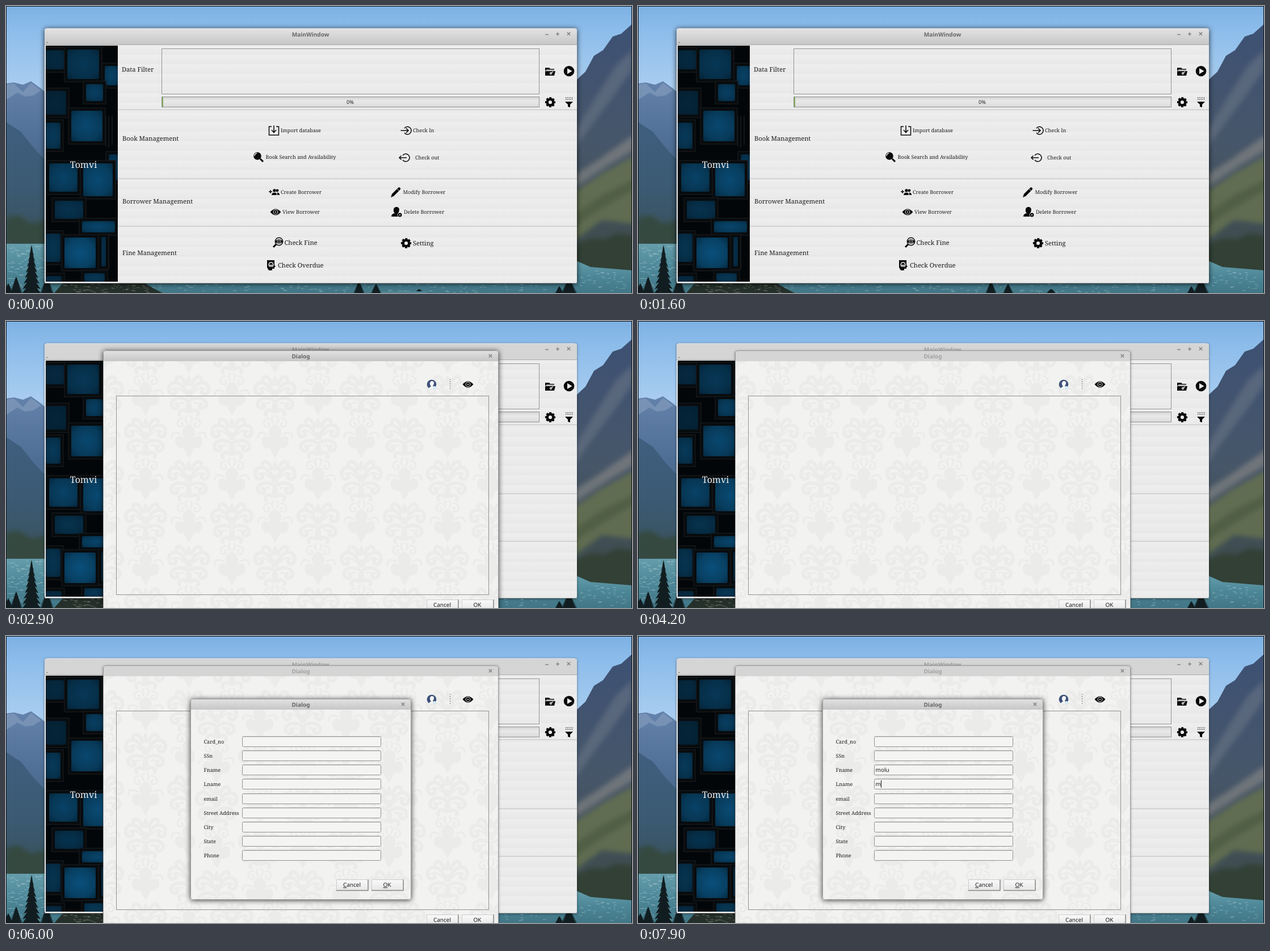
These frames come from a looping animation (1103x507 px, 8000 ms). An HTML page:

```html
<!DOCTYPE html>
<html lang="en">
<head>
<meta charset="utf-8">
<title>Library manager</title>
<style>
html, body { margin: 0; width: 100%; height: 100%; overflow: hidden; background: #84b6e6; }
svg { display: block; width: 1103px; height: 507px; }
text { font-family: "Noto Sans", "Open Sans", sans-serif; font-size: 10px; fill: #1c1c1c; text-rendering: geometricPrecision; white-space: pre; }
.serif { font-family: "Noto Serif", serif; }
.brand { fill: #f4f4f4; }
.title { font-weight: 700; fill: #666; text-anchor: middle; }
.mid { text-anchor: middle; }
.bar { fill: url(#bar); }
.win { filter: drop-shadow(0 1px 5px rgba(0,0,0,.75)); }
.off { filter: drop-shadow(0 1px 2px rgba(0,0,0,.4)); }
.off .bar { fill: #d5d5d5; }
.off .title { fill: #a2a2a2; }
.line { fill: none; stroke: #0a0a0a; stroke-width: 1.5; }
.light { fill: none; stroke: #efefef; stroke-width: 1.3; }
</style>
</head>
<body>
<svg id="stage" viewBox="0 0 1103 507" xmlns="http://www.w3.org/2000/svg"></svg>
<script>
const LOOP = 8000;
const stage = document.getElementById('stage');

let seed = 11;
const random = () => (seed = (seed * 16807) % 2147483647) / 2147483647;

// Basic builders
const rect = (x, y, w, h, fill, more = '') =>
  `<rect x="${x}" y="${y}" width="${w}" height="${h}" fill="${fill}" ${more}/>`;
const path = (d, fill, more = '') => `<path d="${d}" fill="${fill}" ${more}/>`;
const text = (x, y, str, cls = '', size = 10) =>
  `<text x="${x}" y="${y}" class="${cls}" style="font-size:${size}px">${str}</text>`;
const gradient = (id, stops) =>
  `<linearGradient id="${id}" x2="0" y2="1">${stops.map(([at, color]) =>
    `<stop offset="${at}" stop-color="${color}"/>`).join('')}</linearGradient>`;
const frame = (x, y, w, h, fill = 'none', r = 0) =>
  rect(x + .5, y + .5, w, h, fill, `stroke="#929292" rx="${r}"`);

// Icons, each drawn around 0,0
const eye = '<path d="M-9.5 0Q0-11 9.5 0Q0 11-9.5 0Z"/><circle r="4.4" fill="#efefef"/><circle r="3.4"/><circle r="1.1" fill="#efefef"/>';
const lens = '<path d="M-3 3L-8 8" class="line" style="stroke-width:3"/>';
const person = '<path d="M-9 8Q-9 3-3 2Q-6-1-5-5Q-4-9 0-9Q4-9 5-5Q5-1 3 2Q8 3 8 8Z"/>';
const icons = {
  eye,
  folder: '<path d="M-9-6H-2L0-4H7V-1H-9ZM-9 0H9L7 8H-9Z"/><path d="M-7-2H8" class="light"/><circle cx="1" cy="4" r="1.5" class="light"/><path d="M2 3L5 1" class="light"/>',
  play: '<circle r="9.3"/><path d="M-3-5L5.5 0L-3 5Z" fill="#efefef"/>',
  gear: '<circle r="5.3" fill="none" stroke="#0a0a0a" stroke-width="4.4"/><circle r="7.7" fill="none" stroke="#0a0a0a" stroke-width="2.8" stroke-dasharray="3.6 2.448" stroke-dashoffset="1.8"/>',
  funnel: '<path d="M-7-1H7L2 4V9L-2 8V4Z"/><path d="M-6-8H7M-6-5H7" class="line" style="stroke-width:1.6;stroke-dasharray:1.3 1.5;opacity:.75"/>',
  import: '<path d="M-4-7H-8.5V8H8.5V-7H4M0-9V3M-4-1L0 3.5L4-1" class="line"/>',
  search: `<g transform="scale(-1 1)">${lens}<circle cx="2" cy="-2" r="6.8"/></g><path d="M-7-2A5 5 0 0 1-3-7" class="light"/>`,
  checkIn: '<path d="M-3-4A6.7 6.7 0 1 1-3 4M-9.5 0H4M0-4L4 0L0 4" class="line"/>',
  checkOut: '<path d="M-3-4A6.7 6.7 0 1 1-3 4M4 0H-9M-5.5-3.5L-9 0L-5.5 3.5" class="line"/>',
  group: '<path d="M-9-1H-3M-6-4V2" class="line"/><circle cx="1" cy="-3" r="2.7"/><circle cx="6" cy="-3" r="2.4"/><path d="M-4 5Q-3 0 1 1Q5 0 5 5ZM6 5V2L5 1Q10 0 10 5Z"/>',
  pencil: '<path d="M-9 9L-7 3L4-8Q6-10 8-7Q9-6 7-4L-4 7Z"/><path d="M2-6L6-2" class="light" style="stroke-width:.8"/>',
  removeUser: `${person}<circle cx="6" cy="5" r="4.3" fill="#efefef"/><circle cx="6" cy="5" r="3.5"/><path d="M5 4L7 6M7 4L5 6" class="light" style="stroke-width:.9"/>`,
  eyeSearch: `${lens}<circle cx="2" cy="-2" r="6.8" fill="#efefef" stroke="#0a0a0a" stroke-width="1.4"/><g transform="translate(2 -2) scale(.74)">${eye}</g>`,
  head: '<path d="M-7-9H6V-1L8 3H6V6H2V9H-4L-7 4Z"/><path d="M-4 0Q-4-5 0-5Q4-5 4 0Z" class="light"/><path d="M-4 2H4" class="light"/>',
  pay: '<circle cx="4" cy="-4" r="4.3" fill="#efefef" stroke="#0a0a0a" stroke-width="1.4"/><path d="M5.5-6Q2-6 4-4Q6-3 3-2" class="line" style="stroke-width:.9"/><path d="M-9 2H-6V8H-9ZM-5 2H-1L1 3H4V5L9 1L10 3L4 8H-5Z"/>',
  user: '<circle r="8.3" fill="#3d5078"/><path d="M-5 8Q-4 4-1 4Q-4-1-3-3Q-2-6 1-6Q5-5 4-1L2 3L5 5V8Z" fill="#f5f5f5"/><circle cx="5" cy="6" r="3" fill="#d7eaf4"/>',
};
const icon = (name, x, y) => `<g transform="translate(${x} ${y})" fill="#0a0a0a">${icons[name]}</g>`;

const titleBar = (x, y, w, h, cx, label) =>
  path(`M${x} ${y + h}V${y + 4}Q${x} ${y} ${x + 4} ${y}H${x + w - 4}Q${x + w} ${y} ${x + w} ${y + 4}V${y + h}Z`, 'none', 'class="bar"') +
  path(`M${x + 4} ${y + .5}H${x + w - 4}`, 'none', 'stroke="#f3f3f3" stroke-opacity=".7"') +
  text(cx, y + 14.3, label, 'title', 10.05);
const cross = (x, y) => path(`M${x - 2.7} ${y - 2.7}l5.4 5.4m0-5.4l-5.4 5.4`, 'none', 'stroke="#858585" stroke-width="1.6"');
const dots = (x, y) => path(`M${x + .5} ${y}v20`, 'none', 'stroke="#777" stroke-dasharray="2 2"');

function button(x, y, label, underline = true) {
  const str = underline ? `<tspan text-decoration="underline">${label[0]}</tspan>${label.slice(1)}` : label;
  return rect(x, y, 56, 20, 'url(#button)') +
    path(`M${x + .5} ${y + 19}V${y + .5}H${x + 56}`, 'none', 'stroke="#ccc"') +
    path(`M${x} ${y + 19.5}H${x + 56}V${y}`, 'none', 'stroke="#858585" stroke-width="1.5"') +
    text(x + 27.5, y + 13.2, str, 'mid');
}

// Damask wallpaper: motifs in staggered columns, each mirrored about its axis
function damask(id, x, y) {
  const ink = '#ebebea';
  const half = `<path d="M0-34Q8-24 0-14ZM0 34Q11 20 0 8ZM0-10Q9-3 0 6Z"/>
    <path d="M0 52Q17 60 8 76Q24 68 24 84Q22 96 9 95Q4 106 0 112Z"/>
    <g fill="none" stroke="${ink}" stroke-width="6" stroke-linecap="round">
    <path d="M3 2C10-28 36-26 35-9C34 3 20 1 23-7M4 9C22 1 36 12 29 22C22 29 15 20 22 16M6-18C10-34 22-34 22-27M4 30C12 24 20 30 16 36"/>
    <path d="M9-4Q20-16 29-9M10 15Q17 12 20 22M11 42C22 43 23 56 14 57C9 57 9 51 13 50M3 50C7 46 6 40 3 38M14 70Q30 62 30 76" stroke-width="3"/></g>`;
  const motif = (dx, dy) => `<g transform="translate(${dx} ${dy})" fill="${ink}">${half}<g transform="scale(-1 1)">${half}</g></g>`;
  return `<pattern id="${id}" x="${x - 38}" y="${y - 38}" width="152" height="150" patternUnits="userSpaceOnUse">
    ${rect(0, 0, 152, 150, '#f2f2f1')}${motif(38, 38)}${motif(38, -112)}${motif(114, 113)}${motif(114, -37)}</pattern>`;
}

function dialog(id, x, y, w, h, cx, body) {
  return `<g id="${id}" class="win">${rect(x, y, w, h, `url(#${id}Paper)`, 'rx="4"')}
    ${titleBar(x, y, w, 19, cx, 'Dialog')}${cross(x + w - 14.5, y + 9.5)}
    ${rect(x + .5, y + .5, w - 1, h - 1, 'none', 'rx="4" stroke="#777" stroke-opacity=".65"')}${body}</g>`;
}

// Landscape
function fir(x, top, base, w) {
  let left = '', right = '';
  const tiers = 9;
  for (let i = 1; i <= tiers; i++) {
    const y = top + (base - top) * i / tiers, half = w / 2 * i / tiers;
    right += `L${x + half} ${y}L${x + half * .6} ${y - 2}`;
    left = `L${x - half * .6} ${y - 2}L${x - half} ${y}` + left;
  }
  return path(`M${x} ${top}${right}${left}Z`, '#111d20');
}

function flecks(x, w, y, h, count, color) {
  let d = '';
  for (let i = 0; i < count; i++) d += `M${x + random() * w} ${y + random() * h}h${2 + random() * 5}`;
  return path(d, 'none', `stroke="${color}" stroke-opacity=".5"`);
}

function landscape() {
  const glint = '#b4d0d8';
  return rect(0, 0, 1103, 507, 'url(#sky)') +
    path('M0 137L14 135L30 139L44 133L62 146L90 170V430H0Z', 'url(#farHill)') +
    path('M0 139L14 137L30 152L44 136L62 149L48 158L34 160L20 153L0 166Z', '#8fa6c4', 'opacity=".5"') +
    path('M0 205L26 222L50 252L72 275V430H0Z', 'url(#leftHill)') +
    path('M0 374L22 370L44 384L70 378V424H0Z', '#35483f', 'filter="url(#soft)"') +
    path('M990 148L1006 130L1021 116L1036 88L1052 78L1069 54L1084 49L1103 32V470H990Z', 'url(#nearHill)') +
    `<g clip-path="url(#slope)"><g filter="url(#soft)">` +
    path('M1000 225L1040 160L1075 105L1103 78V112L1070 160L1036 205L1000 255Z', '#6c7788', 'opacity=".55"') +
    path('M1000 300L1046 270L1110 225V252L1060 282L1000 322Z', '#8b8a87', 'opacity=".6"') +
    path('M1000 330L1050 296L1110 262V385L1050 378L1000 415Z', '#66734f', 'opacity=".85"') +
    path('M1000 368L1050 334L1110 304V322L1044 362L1000 392Z', '#46553f', 'opacity=".6"') +
    path('M1000 425L1030 410L1056 412L1075 402L1110 406V480H1000Z', '#303f36') + '</g></g>' +
    rect(0, 420, 1006, 87, 'url(#lake)') +
    path('M1000 448L1030 461L1103 467V507H1000Z', 'url(#lake)') +
    flecks(2, 65, 424, 80, 110, glint) + flecks(200, 800, 491, 15, 110, glint) + flecks(1008, 92, 468, 36, 35, glint) +
    fir(45, 422, 510, 36) + fir(18, 478, 512, 28) + fir(4, 490, 512, 24) + fir(72, 476, 512, 30) +
    path('M85 507L100 490H245L262 500L276 507Z', '#25302b') + flecks(95, 160, 491, 15, 60, '#9a9a86') +
    fir(622, 486, 512, 26) + fir(652, 491, 512, 26) + fir(992, 480, 512, 36) + fir(975, 495, 512, 22) + fir(728, 500, 514, 34) +
    `<g id="shore">${rect(661, 504, 81, 3, '#4f8392')}</g>`;
}

// Framed blue tiles of the side panel: x, y, width, height, brightness
const tiles = [
  [70, 78, 32, 34, .3], [174, 106, 24, 34, .75], [70, 150, 36, 42, .2], [108, 77, 56, 52, .55],
  [141, 138, 30, 30, .7], [70, 206, 26, 46, .6], [115, 185, 55, 54, .85], [181, 262, 16, 46, .6],
  [76, 278, 50, 50, .75], [136, 278, 52, 58, .9], [86, 344, 50, 32, .45], [134, 380, 58, 20, .8],
  [70, 402, 26, 50, .5], [103, 409, 55, 54, 1], [168, 408, 8, 52, .4], [138, 472, 36, 15, .55], [70, 477, 28, 10, .3],
];

function sidePanel() {
  return `<g clip-path="url(#panel)">${rect(69, 70, 128, 418, '#030608')}` +
    tiles.map(([x, y, w, h, glow]) =>
      rect(x - 5, y - 5, w + 10, h + 10, '#080b0d', 'stroke="#15191b" stroke-width="1.5"') +
      rect(x, y, w, h, '#041a29', 'rx="2"') + rect(x, y, w, h, 'url(#tile)', `rx="2" opacity="${glow}"`)).join('') +
    path('M176 195V248M181 195V250M187 195V245M181 405V464', 'none', 'stroke="#14181a" stroke-width="2"') +
    '</g>' + text(136.5, 286, 'Tomvi', 'serif mid brand', 16);
}

const actions = [
  ['import', 472, 220, 484, 'Import database', 9.05], ['checkIn', 705, 220, 717, 'Check In', 9.05],
  ['search', 445, 267, 457.5, 'Book Search and Availability', 9.05], ['checkOut', 702, 268, 721, 'Check out', 9.05],
  ['group', 472, 329, 484, 'Create Borrower', 9.05], ['pencil', 687, 329, 699.5, 'Modify Borrower', 9.05],
  ['eye', 475, 364, 487, 'View Borrower', 9.05], ['removeUser', 688, 364, 701, 'Delete Borrower', 9.05],
  ['eyeSearch', 479, 418, 490.5, 'Check Fine', 11.15], ['gear', 705, 419, 717, 'Setting', 11.15],
  ['head', 467, 458, 479, 'Check Overdue', 11.15],
];
const sections = [[204, 116, 'Data Filter'], [205, 238, 'Book Management'], [205, 348.5, 'Borrower Management'], [205, 440, 'Fine Management']];

function mainWindow() {
  return `<g id="main" class="win">${rect(68, 40, 938, 450, '#ececec', 'rx="4"')}` +
    titleBar(68, 39.5, 938, 29, 536.5, 'MainWindow') +
    path('M950 50.5h6M969 49.5h6M972 46.5v6', 'none', 'stroke="#858585" stroke-width="1.6"') + cross(991.5, 49) +
    text(71, 65, '.') + path('M68 68.5H1006', 'none', 'stroke="#a9a9a9"') +
    rect(198, 69, 808, 419, 'url(#stripes)') + sidePanel() +
    [183, 305, 389].map(y => rect(198, y - .5, 808, 2, '#cdcdcd') + rect(198, y + 1.5, 808, 1, '#f7f7f7')).join('') +
    frame(274, 75, 665, 80) + frame(274, 160, 665, 18, 'url(#progress)') +
    rect(275, 161, 2, 17, '#7fae58') + text(606.5, 173.2, '0%', 'mid', 9.1) +
    sections.map(([x, y, label]) => text(x, y, label, 'serif', 11.15)).join('') +
    actions.map(([name, x, y, tx, label, size]) => icon(name, x, y) + text(tx, y + size * .37, label, 'serif', size)).join('') +
    icon('folder', 959, 115) + icon('play', 992, 115) + icon('gear', 959, 170) + icon('funnel', 992, 170) +
    path('M68 489.5H1006', 'none', 'stroke="#a5a5a5"') + '</g>';
}

// Form dialog
const fields = ['Card_no', 'SSn', 'Fname', 'Lname', 'email', 'Street Address', 'City', 'State', 'Phone'];
const rowY = i => Math.round(186 + i * 25.15);
const form = fields.map((label, i) =>
  text(348.5, rowY(i) + 3.6, label, 'serif', 9.05) +
  frame(416, rowY(i) - 9, 244, 18, '#f4f4f3', 2) +
  path(`M418 ${rowY(i) - 7.5}h241`, 'none', 'stroke="#dedede"') +
  `<text id="value${i}" x="418.6" y="${rowY(i) + 3.8}"></text>`).join('');

stage.innerHTML = `<defs>
  ${gradient('sky', [[0, '#7db1e4'], [.1, '#8fbeeb'], [.28, '#a9cdf0'], [1, '#b5d3ee']])}
  ${gradient('farHill', [[0, '#6482ab'], [.4, '#4d6d93'], [1, '#456174']])}
  ${gradient('leftHill', [[0, '#3f5f80'], [.5, '#3b5a73'], [1, '#3a5058']])}
  ${gradient('nearHill', [[0, '#3d5174'], [.5, '#475669'], [1, '#3c4a48']])}
  ${gradient('lake', [[0, '#659dab'], [.5, '#4d8797'], [1, '#427686']])}
  ${gradient('bar', [[0, '#e3e3e3'], [1, '#c6c6c6']])}
  ${gradient('button', [[0, '#fafafa'], [1, '#e6e6e6']])}
  ${gradient('progress', [[0, '#d2d2d2'], [.4, '#e9e9e9'], [1, '#dadada']])}
  ${gradient('band', [[0, '#eeeeee'], [1, '#e8e8e8']])}
  <radialGradient id="tile" r=".75"><stop offset="0" stop-color="#0a4f7b"/><stop offset=".6" stop-color="#084164"/><stop offset="1" stop-color="#04273d"/></radialGradient>
  <filter id="soft"><feGaussianBlur stdDeviation="4"/></filter>
  <clipPath id="panel">${rect(70, 70, 127, 417, '#000')}</clipPath>
  <clipPath id="slope">${rect(1000, 60, 103, 410, '#000')}</clipPath>
  <pattern id="stripes" y="69" width="20" height="17" patternUnits="userSpaceOnUse">${rect(0, 0, 20, 17, 'url(#band)')}</pattern>
  ${damask('finesPaper', 330, 190)}${damask('borrowersPaper', 398, 205)}${damask('formPaper', 371, 148)}
  </defs>` +
  landscape() + mainWindow() +
  dialog('fines', 262, 67, 514, 460, 518.5,
    icon('eyeSearch', 584, 129) + dots(601, 120) + frame(605, 117, 108, 24, '#f4f4f3', 2) + dots(716, 120) +
    icon('pay', 735, 130) + frame(278, 154, 465, 313) + button(648, 485, 'Cancel') + button(710, 485, 'OK')) +
  dialog('borrowers', 171, 52, 697, 480, 519.5,
    icon('user', 750, 112) + dots(782, 102) + icon('eye', 814, 112) + frame(194, 132, 656, 351) +
    button(741, 492, 'Cancel', false) + button(803, 492, 'OK', false)) +
  dialog('form', 325, 111, 389, 355, 519.5,
    form + button(582, 430, 'Cancel') + button(644, 430, 'OK') + '<path id="caret" d="M.5-6V7" stroke="#111"/>') +
  path('M0 .5H1103M.5 0V507M1102.5 0V507', 'none', 'stroke="#0b0f14"');

const $ = id => document.getElementById(id);
const show = (id, on) => $(id).setAttribute('display', on ? 'inline' : 'none');

const firstName = 'molu';
const keyTimes = [6800, 6900, 7100, 7200];
// Field holding the caret from each time on; -1 while it blinks off
const caretSteps = [[4300, 1], [4700, -1], [5100, 1], [5500, 2], [6000, -1], [6400, 2], [7400, 3]];

function render(t) {
  show('shore', t < 1100);
  show('fines', t >= 1700 && t < 2900);
  show('borrowers', t >= 2900);
  show('form', t >= 4300);
  $('main').classList.toggle('off', t >= 1700);
  $('borrowers').classList.toggle('off', t >= 4200);

  $('value2').textContent = firstName.slice(0, keyTimes.filter(k => t >= k).length);
  $('value3').textContent = t >= 7900 ? 'm' : '';

  const row = caretSteps.reduce((at, [time, field]) => t >= time ? field : at, -1);
  show('caret', row >= 0);
  if (row >= 0) {
    const x = 419 + Math.floor($('value' + row).getComputedTextLength());
    $('caret').setAttribute('transform', `translate(${x} ${rowY(row)})`);
  }
}

const start = performance.now();
function tick() {
  render((performance.now() - start) % LOOP);
  requestAnimationFrame(tick);
}
tick();
</script>
</body>
</html>
```
